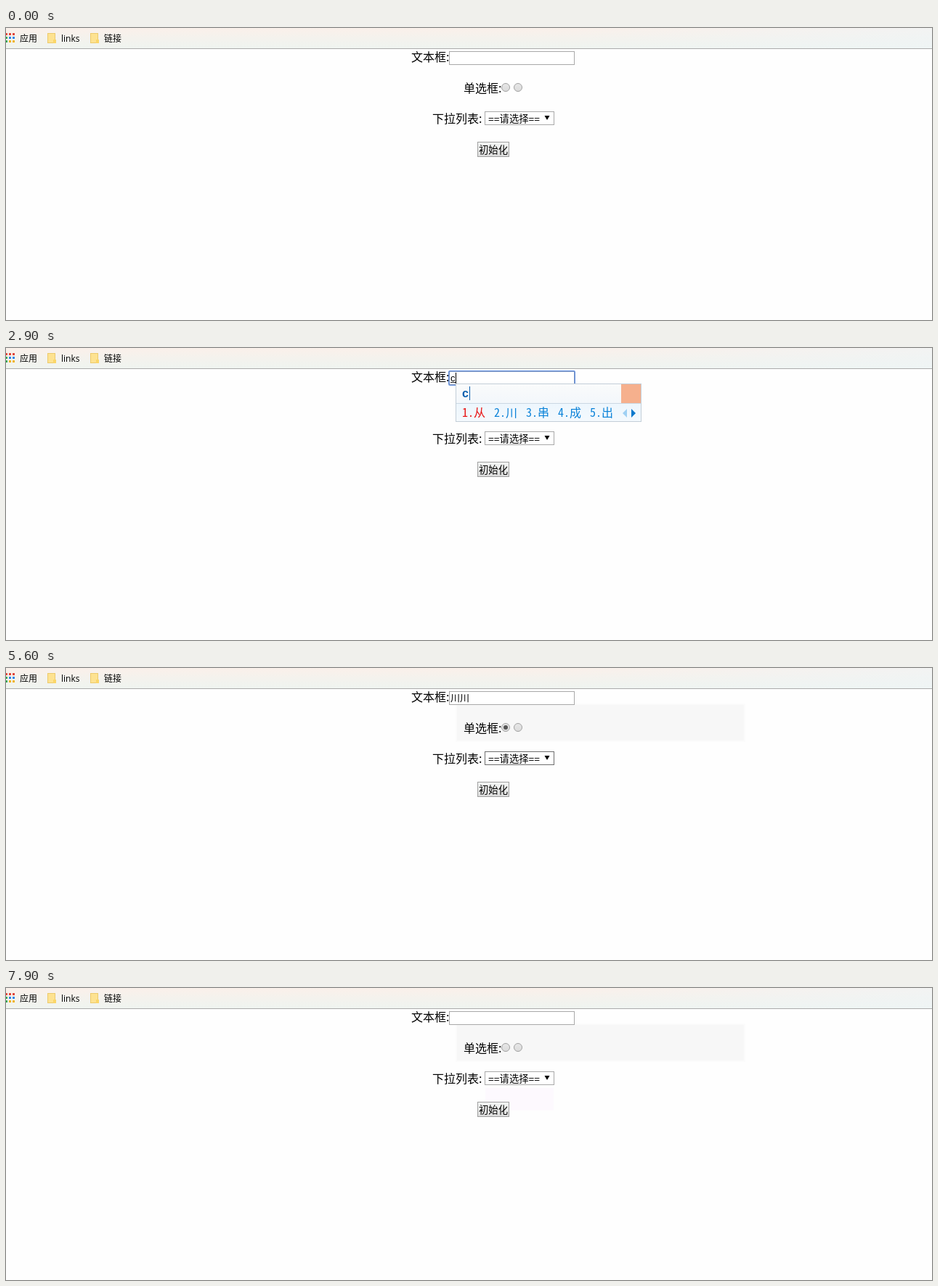
Recreate the animation shown at these times as an HTML page with a canvas. Size 1275 px wide and 403 px high, loop 9400 ms.

```html
<!DOCTYPE html>
<html lang="zh">
<head>
<meta charset="utf-8">
<title>表单初始化</title>
<style>
html, body { margin: 0; width: 100%; height: 100%; overflow: hidden; background: #fefefe; }
canvas { display: block; }
</style>
</head>
<body>
<canvas id="stage" width="1275" height="403"></canvas>
<script>
const ctx = document.getElementById('stage').getContext('2d');
const LOOP = 9400;
const CJK = '"Noto Sans CJK SC", "Noto Sans CJK", sans-serif';
const UI = '"Liberation Sans", ' + CJK;
const GRID = '"Noto Sans Mono CJK SC", "Noto Sans CJK SC", monospace';
const BLUE = '#0a82d8';
const GREY = '#a9a9a9';

// Typed pinyin: start time, letters, shown in the popup, candidates
const TYPING = [
  [2900, 'c', 'c', '从 川 串 成 出'],
  [3000, 'ch', 'ch', '成 出 吃 穿 陈'],
  [3100, 'chu', 'chu', '出 处 除 初 楚'],
  [3200, 'chua', 'chua', '川 串 传 穿 床'],
  [3300, 'chuan', 'chuan', '川 串 传 穿 船'],
  [3400, 'chuanch', "chuan'ch", '川川 串串 传承 穿穿 船厂'],
  [3500, 'chuanchu', "chuan'chu", '传出 穿出 川楚 船出 串出'],
  [3600, 'chuanchua', "chuan'chua", '川川 串串 穿穿 船床 传串'],
  [3800, 'chuanchuan', "chuan'chuan", '川川 串串 传传 穿穿 船船']
];
const OPTIONS = ['==请选择==', '1', '2', '3'];
const OPTION_TOPS = [135, 153, 170, 186, 203];

function fill(x, y, w, h, color) {
  ctx.fillStyle = color;
  ctx.fillRect(x, y, w, h);
}

function frame(x, y, w, h, color) {
  ctx.strokeStyle = color;
  ctx.lineWidth = 1;
  ctx.strokeRect(x + .5, y + .5, w - 1, h - 1);
}

function text(str, x, y, font, color = '#000') {
  ctx.font = font;
  ctx.fillStyle = color;
  ctx.fillText(str, x, y);
}

function ramp(y0, y1, ...colors) {
  const g = ctx.createLinearGradient(0, y0, 0, y1);
  colors.forEach((c, i) => g.addColorStop(i / (colors.length - 1), c));
  return g;
}

function poly(color, ...pts) {
  ctx.fillStyle = color;
  ctx.beginPath();
  for (let i = 0; i < pts.length; i += 2) ctx.lineTo(pts[i], pts[i + 1]);
  ctx.fill();
}

function focusRing(x, y, w, h) {
  ctx.strokeStyle = 'rgba(77, 128, 220, .85)';
  ctx.lineWidth = 1.6;
  ctx.beginPath();
  ctx.roundRect(x - .2, y - .2, w + .4, h + .4, 1.5);
  ctx.stroke();
}

const within = (t, a, b) => t >= a && t < b;

function folder(x) {
  fill(x, 7, 11, 14, '#fde291');
  frame(x, 7, 11, 14, '#ecca6c');
  fill(x + 8, 16, 4, 5, '#fbd668');
}

function bookmarks() {
  fill(0, 0, 1275, 28, ramp(0, 28, '#faf0ea', '#f4f2ed', '#eff4f0'));
  const tint = ctx.createLinearGradient(0, 0, 1275, 0);
  tint.addColorStop(.6, 'rgba(238, 245, 248, 0)');
  tint.addColorStop(1, 'rgba(238, 245, 248, .6)');
  fill(0, 0, 1275, 28, tint);
  fill(0, 28, 1275, 1, '#ababab');
  const dots = ['#e0453a', '#e0453a', '#e0453a', '#35a853', '#2f86e8', '#2f86e8', '#35a853', '#f0b41e', '#f0b41e'];
  dots.forEach((c, i) => fill([0, 4, 9][i % 3], 7 + 5 * Math.floor(i / 3), i % 3 ? 3 : 2, 3, c));
  text('应用', 19, 19, '12px ' + CJK);
  folder(57);
  text('links', 76, 19, '12px "Open Sans", sans-serif');
  folder(116);
  text('链接', 135, 19, '12px ' + CJK);
}

function textBox(t, typed) {
  const focused = within(t, 1100, 5300);
  fill(610, 32, 173, 19, '#fff');
  frame(610, 32, 173, 19, GREY);
  if (focused) focusRing(610, 32, 173, 19);

  let value = '', width = 0;
  if (within(t, 1800, 2300)) { value = 'v'; width = 7; }
  if (typed) { value = typed[1]; width = 7 * value.length; }
  if (width) fill(612, 47, width, 1, '#222');
  if (within(t, 3900, 7600)) { value = '川川'; width = 27; }
  text(value, 612, 46, '13px ' + UI);

  const blinkOff = within(t, 1600, 1800) || within(t, 2800, 2900) || within(t, 4400, 4900);
  if (focused && !blinkOff) fill(612 + width, 34, 1, 15, '#000');
}

function radio(x, hover, checked) {
  ctx.beginPath();
  ctx.arc(x, 82, 5.5, 0, 7);
  ctx.fillStyle = ramp(76, 88, hover ? '#f4f4f4' : '#e8e8e8', '#dadada');
  ctx.fill();
  ctx.lineWidth = 1;
  ctx.strokeStyle = hover ? '#8c8c8c' : '#a2a2a2';
  ctx.stroke();
  if (!checked) return;
  ctx.beginPath();
  ctx.arc(x, 82, 3, 0, 7);
  ctx.fillStyle = '#555';
  ctx.fill();
}

function selectBox(t, chosen) {
  const y = chosen ? 117 : 115;
  fill(659, y, 96, 19, '#fff');
  frame(659, y, 96, 19, within(t, 5600, 5900) ? '#6e6e6e' : GREY);
  if (within(t, 5900, 7500)) focusRing(659, y, 96, 19);
  text(chosen ? '2' : OPTIONS[0], 664, chosen ? 131 : 130, '13.333px ' + UI);
  const top = chosen ? 123 : 121;
  poly('#000', 741.5, top, 748.5, top, 745, top + 6);
}

function optionList(t) {
  const active = t < 6200 ? 0 : t < 6600 ? 1 : 2;
  fill(659, 134, 96, 70, '#fff');
  OPTIONS.forEach((label, i) => {
    const y = OPTION_TOPS[i], on = i === active;
    if (on) fill(660, y, 94, OPTION_TOPS[i + 1] - y, '#1e90ff');
    text(label, 664, y + 13, '13.333px ' + UI, on ? '#fff' : '#000');
  });
  frame(659, 134, 96, 70, GREY);
}

function button(t, y) {
  const hover = within(t, 7200, 7900);
  const pressed = within(t, 7500, 7600);
  fill(649, y, 44, 21, pressed ? ramp(y, y + 21, '#dcdcdc', '#f0f0f0') : ramp(y, y + 21, '#f3f5f4', '#ebeceb', '#d9d9d9'));
  frame(649, y, 44, 21, hover ? '#7c7c7c' : '#a0a0a0');
  text('初始化', 651, y + 16, '13.333px ' + CJK);
}

// Faint patch left behind by the popup
function patch(right) {
  fill(619, 49, right - 619, 53, '#fbfbfb');
  fill(621, 51, Math.min(right, 1016) - 621, 49, '#f7f7f7');
}

function popupBase(x, w, h, paint) {
  fill(x, 49, w, h, paint);
  fill(x + w - 28, 50, 27, 26, '#f6b08d');
}

function formulaPopup() {
  popupBase(619, 212, 102, ramp(49, 151, '#f8f9fa', '#f5f8fb', '#eaf5fd', '#f3f9fd', '#f9fbfc'));
  frame(619, 49, 212, 102, '#c3ced8');
  text('v', 627, 69, 'bold 16px ' + UI, '#0a5fae');
  fill(636, 54, 1, 20, '#f01818');
  ['数字 (如：v123)', '日期 (如：v2013/1/1)', '算式 (如：v1+1)', '函数 (如：v2^3)'].forEach((line, i) => {
    fill(634, 87 + 16 * i, 2, 2, BLUE);
    text(line, 646, 92 + 16 * i, '12px ' + GRID, BLUE);
  });
  text('查看函数列表', 748, 140, '12px ' + GRID, BLUE);
  fill(748, 142, 72, 1, BLUE);
}

function pinyinPopup([, letters, shown, list]) {
  const words = list.split(' ');
  const x = 612 + 7 * letters.length;
  const step = 28 + 16 * words[0].length;
  const w = 36 + 5 * step;
  popupBase(x, w, 53, ramp(49, 76, '#fafbfb', '#f3f7fb'));
  fill(x, 76, w, 26, ramp(76, 102, '#edf6fd', '#f4f9fd'));
  fill(x, 76, w, 1, '#cbd8e3');
  frame(x, 49, w, 53, '#c3ced8');
  text(shown, x + 9, 68, 'bold 16px ' + UI, '#0a5fae');
  fill(x + 9 + Math.round(ctx.measureText(shown).width) + 1, 53, 1, 19, '#0a5fae');
  words.forEach((word, i) => {
    text(`${i + 1}.${word}`, x + 9 + step * i, 95, '300 16px ' + GRID, i ? BLUE : '#e81010');
  });
  const a = x + w - 26;
  poly('#9fd0f3', a + 6, 84, a + 6, 96, a, 90);
  poly('#0a78cc', a + 12, 84, a + 12, 96, a + 18, 90);
}

function draw(t) {
  const typed = t < 3900 ? TYPING.filter(s => t >= s[0]).pop() : null;
  const chosen = within(t, 6900, 7600);

  fill(0, 0, 1275, 403, '#fefefe');
  bookmarks();
  if (typed && typed[1].length > 1) patch(612 + 7 * typed[1].length);
  if (t >= 3900) patch(1018);
  if (t >= 6900) fill(660, 138, 94, 31, '#fdf9fe');

  text('文本框:', 558, 46, '16px ' + CJK);
  textBox(t, typed);
  text('单选框:', 630, 89, '16px ' + CJK);
  radio(688, within(t, 5100, 5600), within(t, 5300, 7600));
  radio(705, false, false);
  text('下拉列表:', 587, 131, '16px ' + CJK);
  selectBox(t, chosen);
  button(t, chosen ? 158 : 157);

  if (within(t, 5900, 6900)) optionList(t);
  if (within(t, 1800, 2300)) formulaPopup();
  if (typed) pinyinPopup(typed);
}

const start = performance.now();
function tick() {
  draw((performance.now() - start) % LOOP);
  requestAnimationFrame(tick);
}
tick();
</script>
</body>
</html>
```
